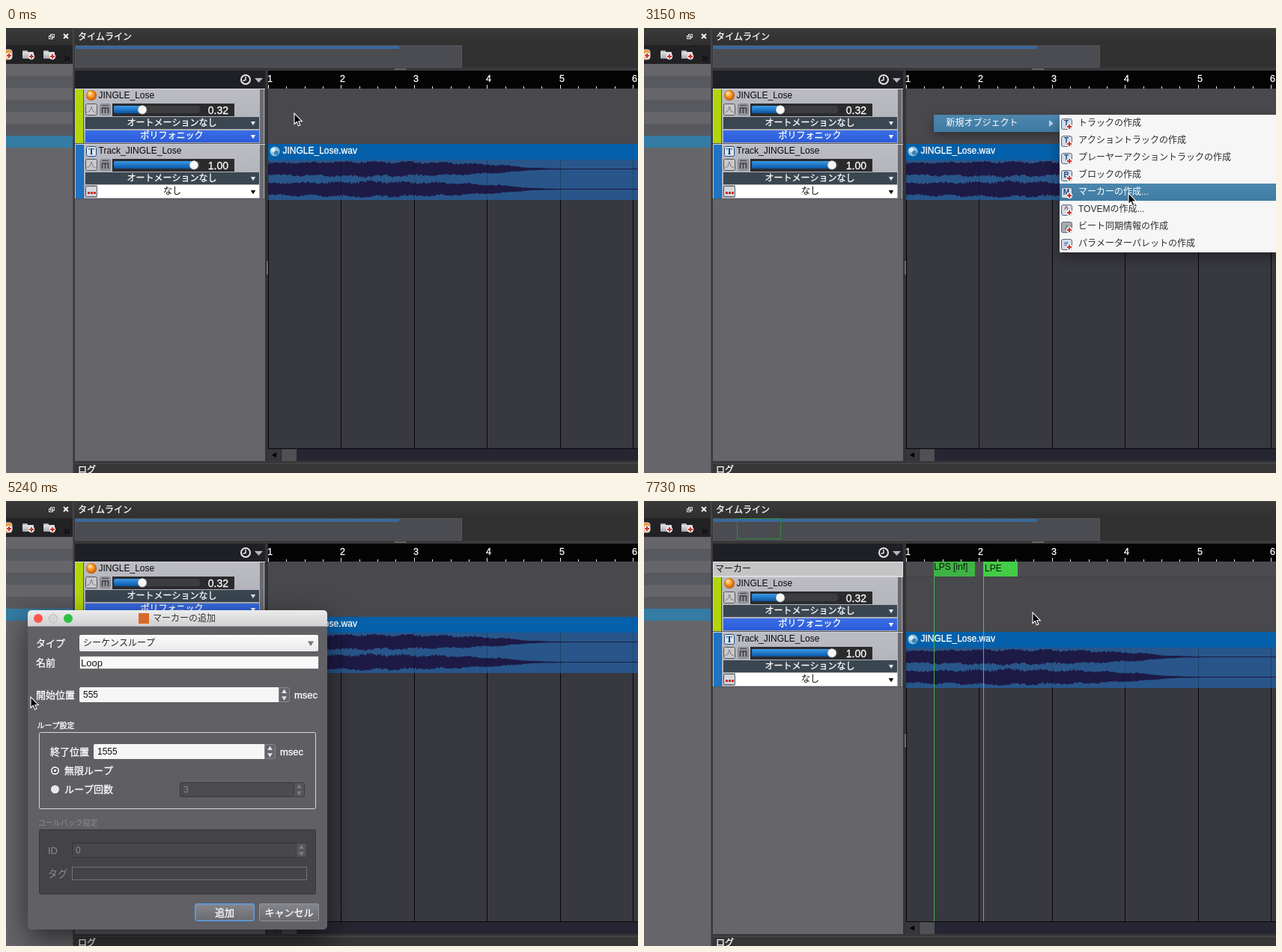
Recreate the animation shown at these times as an HTML page with a canvas. Size 844 px wide and 595 px high, loop 8000 ms.

```html
<!DOCTYPE html>
<html lang="ja">
<head>
<meta charset="utf-8">
<title>タイムライン</title>
<style>
html, body { margin: 0; width: 100%; height: 100%; overflow: hidden; background: #66666a; }
canvas { display: block; width: 844px; height: 595px; }
</style>
</head>
<body>
<canvas id="stage" width="844" height="595"></canvas>
<script>
const c = document.getElementById('stage').getContext('2d');
const LOOP = 8000;
const FONT = '"Liberation Sans", "Noto Sans CJK JP", "Noto Sans CJK", sans-serif';
const BEAT = 97.4;

// Pointer poses: time, x, y; each is held until the next
const POSES = [
  [0, 385, 114], [1500, 424, 120], [1650, 428, 120], [2250, 508, 120],
  [2400, 572, 128], [2550, 622, 184], [2700, 645, 228], [3000, 646, 225],
  [3150, 647, 221], [4490, 590, 228], [4640, 420, 215], [4790, 250, 225],
  [4940, 110, 255], [5080, 45, 258], [5230, 33, 262], [5380, 60, 320],
  [5530, 100, 345], [5680, 150, 380], [5830, 220, 450], [5980, 275, 525],
  [6110, 302, 553], [7140, 340, 470], [7290, 410, 330], [7440, 470, 220],
  [7590, 510, 160], [7730, 519, 149]
];
const ITEMS = [
  ['トラックの作成', 'T'], ['アクショントラックの作成', 'T'],
  ['プレーヤーアクショントラックの作成', 'T'], ['ブロックの作成', 'B'],
  ['マーカーの作成...', 'M'], ['TOVEMの作成...', '^'],
  ['ビート同期情報の作成', '♪'], ['パラメーターパレットの作成', '≡']
];

function box(x, y, w, h, fill) {
  c.fillStyle = fill;
  c.fillRect(x, y, w, h);
}
function frame(x, y, w, h, color) {
  c.strokeStyle = color;
  c.lineWidth = 1;
  c.strokeRect(x + .5, y + .5, w - 1, h - 1);
}
function grad(y, h, top, bottom) {
  const g = c.createLinearGradient(0, y, 0, y + h);
  g.addColorStop(0, top);
  g.addColorStop(1, bottom);
  return g;
}
function round(x, y, w, h, r, fill, stroke) {
  c.beginPath();
  c.roundRect(x, y, w, h, r);
  if (fill) { c.fillStyle = fill; c.fill(); }
  if (stroke) { c.strokeStyle = stroke; c.lineWidth = 1; c.stroke(); }
}
function dot(x, y, r, fill) {
  c.beginPath();
  c.arc(x, y, r, 0, Math.PI * 2);
  c.fillStyle = fill;
  c.fill();
}
function poly(fill, ...p) {
  c.beginPath();
  for (let i = 0; i < p.length; i += 2) c.lineTo(p[i], p[i + 1]);
  c.closePath();
  c.fillStyle = fill;
  c.fill();
}
function line(color, w, ...p) {
  c.beginPath();
  for (let i = 0; i < p.length; i += 2) c.lineTo(p[i], p[i + 1]);
  c.strokeStyle = color;
  c.lineWidth = w;
  c.stroke();
}
// Text centred vertically on y; weight 500 gets a hairline of extra ink
function text(s, x, y, color, size = 12, align = 'left', weight = 400) {
  c.font = `${weight} ${size}px ${FONT}`;
  c.textAlign = align;
  c.fillStyle = color;
  c.fillText(s, x, y + size * .36);
  if (weight === 500) {
    c.strokeStyle = color;
    c.lineWidth = .3;
    c.strokeText(s, x, y + size * .36);
  }
}
const down = (x, y, r, fill) => poly(fill, x - r, y - r * .6, x + r, y - r * .6, x, y + r);
const up = (x, y, r, fill) => poly(fill, x - r, y + r * .6, x + r, y + r * .6, x, y - r);

function plus(x, y) {
  dot(x, y, 4.2, '#efefef');
  box(x - 3, y - 1, 6, 2, '#cc342c');
  box(x - 1, y - 3, 2, 6, '#cc342c');
}
function folder(x) {
  round(x - 8, 30, 7, 5, 1, '#aeb0b4');
  round(x - 8, 32, 15, 9, 1, grad(32, 9, '#e4e4e6', '#a4a6aa'));
  plus(x + 4, 38);
}

function leftPanel() {
  box(0, 0, 90, 23, grad(0, 23, '#3a3a3a', '#2f2f2f'));
  box(0, 23, 90, 25, '#222225');
  for (let i = 0; i < 7; i++) box(0, 48 + i * 16, 90, 16, i % 2 ? '#58595e' : '#66666a');
  box(0, 144, 90, 16, '#347ca4');
  box(0, 160, 90, 435, '#66666a');
  frame(59, 8, 6, 5, '#e0e0e0');
  frame(57, 10, 6, 5, '#e0e0e0');
  line('#f0f0f0', 2, 77, 8, 83, 14);
  line('#f0f0f0', 2, 83, 8, 77, 14);
  round(-8, 29, 16, 13, 3, '#e79a3e', '#d8d8d8');
  plus(4, 37);
  folder(30);
  folder(58);
  text('»', 77, 39, '#070707', 16);
  box(89, 0, 3, 595, '#3a3a3c');
  box(89, 0, 1, 595, '#4c4c50');
}

function topPanel(marked) {
  box(92, 0, 752, 23, grad(0, 23, '#3a3a3a', '#303030'));
  box(92, 0, 752, 1, '#4a4a4a');
  text('タイムライン', 96, 11.5, '#fff', 12, 'left', 500);
  box(92, 23, 752, 30, '#313131');
  box(92, 23, 516, 30, '#4b4c51');
  box(92, 23, 433, 5, '#3a689a');
  frame(92, 23, 517, 30, '#55565a');
  if (marked) frame(124, 23, 59, 28, '#2e8c3c');
  box(92, 53, 752, 4, '#39393b');
  for (let x = 519; x < 535; x += 2) box(x, 54, 1, 2, '#909090');
  box(92, 57, 254, 24, '#1f2025');
  c.beginPath();
  c.arc(320, 69, 6, 0, 7);
  c.strokeStyle = '#e8e8e8';
  c.lineWidth = 2;
  c.stroke();
  line('#e8e8e8', 1.5, 320, 65, 320, 69.5, 316.5, 70.5);
  poly('#b8b8b8', 332, 67, 343, 67, 337.5, 73);
}

function ruler() {
  box(350, 57, 494, 24, '#040405');
  for (let i = 0; i < 21; i++) {
    const x = Math.round(350 + i * BEAT / 4);
    const major = i % 4 === 0;
    box(x, major ? 76 : 78, 1, major ? 5 : 3, '#e8e8e8');
    if (major) text(1 + i / 4, x - 1, 67, '#fff', 12.5, 'left', 500);
  }
}

function rand(n) {
  const v = Math.sin(n * 12.9898) * 43758.5453;
  return v - Math.floor(v);
}
function envelope(u) {
  const pts = [[0, 8.6], [90, 10], [125, 11], [240, 9], [310, 5.5], [328, 4.3], [345, 2], [375, 1], [400, .5], [500, .5]];
  const i = pts.findIndex(p => p[0] > u);
  const [a, b] = [pts[i - 1], pts[i]];
  return a[1] + (b[1] - a[1]) * (u - a[0]) / (b[0] - a[0]);
}
const wave = new Path2D();
[188.5, 215.5].forEach((mid, ch) => {
  for (let u = 0; u < 494; u++) {
    const e = envelope(u);
    const reach = side => e * (.78 + .1 * Math.sin(u / 7 + side * 2 + ch)
      + .24 * rand((u >> 1) + side * 900 + ch * 2100));
    const top = Math.max(.5, reach(0)), low = Math.max(.5, reach(1));
    wave.rect(350 + u, mid - top, 1, top + low);
  }
});

function timeline(dy) {
  box(350, 81, 494, 74 + dy, '#48484d');
  if (dy) {
    box(350, 81, 494, 20, '#4c4c50');
    box(350, 101, 494, 1, '#424247');
  }
  box(350, 230 + dy, 494, 332 - dy, '#383840');
  c.save();
  c.translate(0, dy);
  box(350, 155, 494, 21, '#0460aa');
  box(350, 176, 494, 54, '#28568a');
  c.fillStyle = '#1d1a46';
  c.fill(wave);
  dot(359, 165, 6.5, '#8fc3e2');
  dot(357, 163, 3, '#d6ecf6');
  dot(361, 167, 3, '#3d83ab');
  text('JINGLE_Lose.wav', 369.5, 164, '#fff', 12, 'left', 500);
  c.restore();
  for (let i = 0; i < 6; i++) {
    const x = Math.round(350 + i * BEAT);
    box(x, 176 + dy, 1, 54, 'rgba(0,0,0,.22)');
    box(x, 230 + dy, 1, 332 - dy, '#050507');
  }
  box(350, 562, 494, 18, '#262632');
  box(350, 562, 494, 1, '#08080a');
  box(350, 563, 17, 16, '#37373a');
  poly('#000', 355, 571, 361, 567.5, 361, 574.5);
  box(368, 563, 20, 16, '#505055');
}

function sign(x, w, s, y, color) {
  box(x, 101, 1, 461, color);
  box(x, 81, w, 20, color);
  text(s, x + (w > 50 ? 0 : 2), y, '#081808');
}

function track(y, name, color, knob, value, icon, extra) {
  box(92, y, 254, 74, '#55565c');
  box(92, y, 1, 73, '#c4c4ca');
  box(93, y + 1, 10, 72, color);
  box(104, y + 1, 235, 72, grad(y, 73, '#bbbcc4', '#acadb5'));
  box(92, y, 254, 1, '#d6d6dc');
  box(339, y + 1, 5, 72, '#6a6b71');
  box(344, y + 1, 1, 72, '#a8a8ae');
  icon(y);
  text(name, 123.5, y + 9, '#0a0a0a');
  round(106.5, y + 20.5, 15, 15, 2, '#c8c8ca', '#55565a');
  line('#808084', 1, 108, y + 32, 112, y + 30, 114, y + 24, 116, y + 30, 120, y + 32);
  round(125.5, y + 20.5, 14, 15, 2, '#96979d', '#85868d');
  line('#3c3d43', 1.6, 128.5, y + 33, 128.5, y + 26, 136.5, y + 26, 136.5, y + 33);
  line('#3c3d43', 1.6, 132.5, y + 26, 132.5, y + 33);
  box(128, y + 22, 9, 1, '#3c3d43');
  box(142, y + 20, 163, 17, '#2b2b2e');
  round(144, y + 23, 115, 10, 4, '#3c3d3f');
  round(144, y + 23, knob - 144, 10, 2, grad(y + 23, 10, '#3b9be8', '#0a55a4'));
  dot(knob, y + 28.5, 6, '#b8b8b8');
  dot(knob, y + 28, 5.4, '#f6f6f6');
  text(value, 297, y + 28.5, '#fff', 14, 'right', 500);
  box(106, y + 38, 232, 16, '#3a4650');
  text('オートメーションなし', 221.5, y + 45.5, '#fff', 12, 'center', 500);
  down(330, y + 46, 3.2, '#dfe4e8');
  extra(y + 55);
}
function ball(y) {
  const g = c.createRadialGradient(112, y + 6, 1, 114, y + 9, 8);
  g.addColorStop(0, '#ffe6b0');
  g.addColorStop(.4, '#ff9a22');
  g.addColorStop(1, '#b24800');
  dot(114, y + 9, 7, g);
}
function badge(y) {
  round(107.5, y + 3.5, 13, 13, 2, '#dce6f2', '#1f4c80');
  c.font = 'bold 12px "Liberation Serif", serif';
  c.textAlign = 'center';
  c.fillStyle = '#12335c';
  c.fillText('T', 114, y + 14);
}
function polyphonic(y) {
  box(106, y + 1, 232, 16, grad(y, 17, '#3a6ee6', '#2a5cd8'));
  text('ポリフォニック', 221.5, y + 8, '#fff', 12, 'center', 500);
  down(330, y + 9, 3.2, '#fff');
}
function none(y) {
  box(122, y, 216, 17, '#fff');
  round(106.5, y + 1.5, 15, 14, 2, '#d4d8e0', '#55565a');
  [110, 114, 118].forEach(x => box(x - 1, y + 9, 3, 3, '#c82a24'));
  text('なし', 222, y + 8, '#111', 12, 'center');
  down(330, y + 9, 3.2, '#000');
}

function desk(marked) {
  const dy = marked ? 20 : 0;
  leftPanel();
  box(92, 57, 254, 523, '#66666a');
  topPanel(marked);
  ruler();
  timeline(dy);
  if (marked) {
    box(92, 81, 254, 20, '#c4c4c5');
    frame(92, 81, 254, 20, '#e0e0e0');
    text('マーカー', 95, 90.5, '#111');
    sign(387, 55, 'LPS [inf]', 88, '#3fb344');
    sign(453, 46, 'LPE', 90, '#43cc46');
  }
  track(81 + dy, 'JINGLE_Lose', '#b2d608', 182, '0.32', ball, polyphonic);
  track(155 + dy, 'Track_JINGLE_Lose', '#2173c2', 251, '1.00', badge, none);
  box(346, 57, 4, 523, '#343437');
  for (let y = 312; y < 329; y += 2) box(348, y, 2, 1, '#a0a0a0');
  box(92, 579, 752, 3, '#39393b');
  box(92, 582, 752, 13, '#363636');
  box(92, 582, 752, 1, '#4a4a4a');
  text('ログ', 96, 591, '#fff', 12, 'left', 500);
}

function shadow(blur, dy, alpha, draw) {
  c.save();
  c.shadowColor = `rgba(0,0,0,${alpha})`;
  c.shadowBlur = blur;
  c.shadowOffsetY = dy;
  draw();
  c.restore();
}

function menu(active) {
  const fill = active ? grad(116, 23, '#4d87ae', '#407aa2') : '#f5f5f6';
  shadow(14, 5, .35, () => box(387, 116, 168, 23, fill));
  text('新規オブジェクト', 403.5, 127, active ? '#fff' : '#2c2c2c');
  poly(active ? '#c2d4e2' : '#555', 541, 123, 541, 132, 546.5, 127.5);
}
function submenu(x, y) {
  const hot = x >= 555 ? Math.floor((y - 116) / 23) : -1;
  shadow(16, 7, .35, () => box(555, 116, 300, 184, '#f6f6f7'));
  ITEMS.forEach(([label, glyph], i) => {
    const mid = 127.5 + i * 23;
    if (i === hot) box(555, mid - 11.5, 289, 23, grad(mid - 11, 23, '#4a86ad', '#417ba3'));
    round(557.5, mid - 6, 14, 14, 2.5, i === 6 ? '#a9abb0' : '#d3dcea', '#59677c');
    text(glyph, 564, mid, i === 5 ? '#a04a2c' : '#1d4678', 10, 'center', 700);
    plus(568, mid + 4.5);
    text(label, 580, mid - .5, i === hot ? '#fff' : '#2c2c2c');
  });
}

function spinner(x, y, h, off) {
  round(x + .5, y + .5, 14, h - 1, 2, off ? '#55555a' : '#65666b', off ? '#3c3c41' : '#88898e');
  const color = off ? '#7c7c82' : '#e2e2e4';
  up(x + 7.5, y + h * .3, 3.4, color);
  down(x + 7.5, y + h * .72, 3.4, color);
}
function radio(y, on) {
  dot(65.5, y, 5.5, '#e8e8ea');
  if (on) {
    dot(65.5, y, 3.6, '#45464b');
    dot(65.5, y, 1.8, '#fff');
  }
}
function button(x, s, main, pressed) {
  const fill = pressed ? grad(539, 23, '#6b7079', '#646870') : grad(539, 23, '#85868b', '#696a70');
  round(x + .5, 538.5, 79, 23, 2, fill, main ? '#5b9ee6' : '#94959a');
  if (main && !pressed) round(x + 1.5, 539.5, 77, 21, 2, null, 'rgba(91,158,230,.55)');
  text(s, x + 40, 550, '#fff', 13, 'center', 500);
}

function dialog(t) {
  const label = (s, x, y) => text(s, x, y, '#fff', 13, 'left', 500);
  shadow(42, 14, .6, () => round(29, 146, 400, 427, 5, '#606065'));
  round(29, 146, 400, 22, [5, 5, 0, 0], grad(146, 22, '#ececec', '#cfcfcf'));
  box(29, 167, 400, 1, '#a8a8a8');
  dot(43, 157, 6, '#fb5550');
  dot(63, 157, 6, '#b4b4b4');
  dot(63, 157, 5.2, '#d6d6d6');
  dot(83, 157, 6, '#2fc043');
  box(177, 150, 14, 14, '#d9692a');
  text('マーカーの追加', 196, 157, '#333');

  label('タイプ', 40, 190);
  round(98, 179, 319, 22, 2, grad(179, 22, '#fbfbfb', '#e9e9ea'));
  text('シーケンスループ', 103, 189.5, '#222');
  down(407, 190, 4, '#77787c');
  label('名前', 40, 216);
  box(98, 207, 320, 18, '#77787d');
  box(99, 208, 318, 16, t >= 6260 ? '#e8e8e8' : '#f9f9f9');
  text('Loop', 100, 216, '#111', 13);
  if (t < 4190 || (t >= 4640 && t < 5230)) box(129, 209, 1, 14, '#000');

  label('開始位置', 40, 259);
  round(98, 249, 267, 20, 2, '#f6f6f7');
  text('555', 103, 259, '#111');
  spinner(364, 249, 20);
  label('msec', 385, 259.5);

  text('ループ設定', 41.5, 300, '#fff', 10, 'left', 500);
  round(44.5, 309.5, 369, 102, 2, '#5e5e63', '#d9d9dc');
  label('終了位置', 59, 335);
  round(117, 325, 229, 20, 2, '#f6f6f7');
  text('1555', 122, 335, '#111');
  spinner(345, 325, 20);
  label('msec', 366, 335.5);
  radio(360.5, true);
  label('無限ループ', 78, 360);
  radio(385.5, false);
  label('ループ回数', 78, 385);
  round(232.5, 376.5, 152, 19, 2, '#4b4b50', '#37373b');
  text('3', 237, 386, '#8a8a8f');
  spinner(384, 376, 20, true);

  text('コールバック設定', 42.5, 430, '#8c8c91', 10);
  round(44.5, 439.5, 369, 86, 2, '#434348', '#37373b');
  text('ID', 56, 467.5, '#8c8c91', 13);
  round(88.5, 457.5, 299, 19, 2, '#47474c', '#333338');
  text('0', 93, 467, '#8a8a8f');
  spinner(387, 457, 20, true);
  text('タグ', 56, 498, '#8c8c91', 13);
  frame(88, 489, 314, 18, '#737378');

  button(252, '追加', true, t >= 6400);
  button(338, 'キャンセル', false, false);
}

function pointer(x, y) {
  c.save();
  c.translate(x - .5, y - .5);
  c.beginPath();
  [[.5, .5], [.5, 15], [3.8, 12], [6, 17.2], [8.4, 16.2], [6.2, 11.2], [10.8, 11.2]]
    .forEach(p => c.lineTo(...p));
  c.closePath();
  c.fillStyle = '#000';
  c.fill();
  c.strokeStyle = '#fff';
  c.lineWidth = 1.1;
  c.stroke();
  c.restore();
}

function draw(t) {
  const [, x, y] = POSES.findLast(p => p[0] <= t);
  desk(t >= 6550);
  if (t >= 150 && t < 3750) menu(t >= 1500);
  if (t >= 1650 && t < 3750) submenu(x, y);
  if (t >= 3900 && t < 6550) dialog(t);
  pointer(x, y);
}

const start = performance.now();
function tick() {
  draw((performance.now() - start) % LOOP);
  requestAnimationFrame(tick);
}
tick();
</script>
</body>
</html>
```
